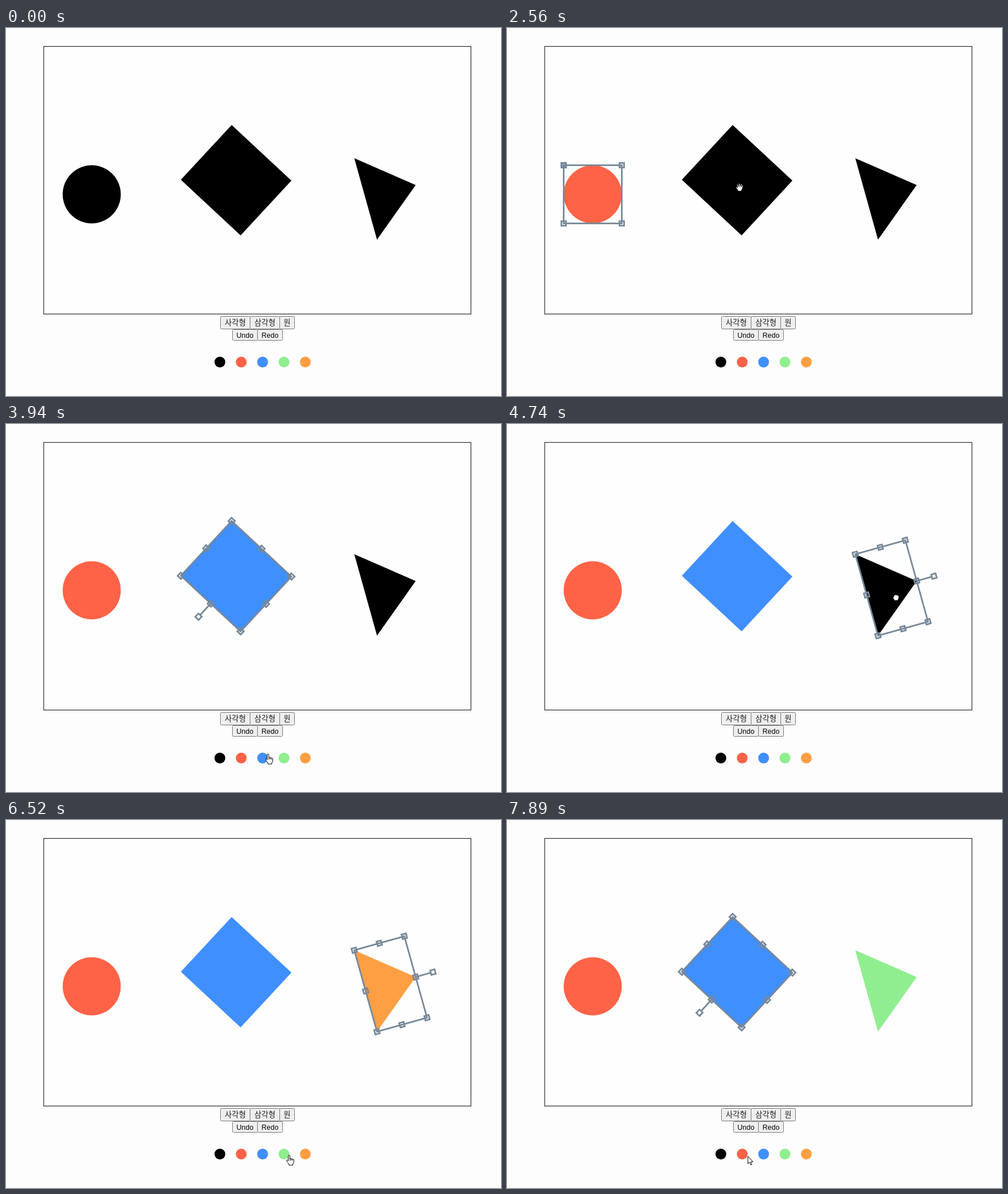
Animation, 869 px wide and 645 px high, one loop 7.99 s. Source, as an HTML page:

```html
<!DOCTYPE html>
<html lang="ko">
<head>
<meta charset="utf-8">
<title>Shape editor</title>
<style>
  html, body { margin: 0; width: 100%; height: 100%; overflow: hidden; background: #fdfdfd; }
  svg { display: block; }
  text { font: 12.5px "Liberation Sans", Arial, sans-serif; text-anchor: middle; }
  .ko { font: 300 13.4px "Noto Sans CJK KR", "Noto Sans CJK", sans-serif; fill: #222; }
  .button { fill: #efefef; stroke: #767676; }
  .frame { fill: none; stroke: #778899; stroke-width: 2.8; }
  .cursor { stroke: #000; stroke-width: 1; stroke-linejoin: round; fill: #fff; }
</style>
</head>
<body>
<svg id="stage" width="869" height="645" viewBox="0 0 869 645"></svg>
<script>
const LOOP = 7990, PRESS = 100, TICK = 98;
const COLORS = ['#000', '#ff6347', '#408fff', '#90ee90', '#ff9f43'];
const stage = document.getElementById('stage');

function add(parent, tag, attrs, text) {
  const el = document.createElementNS('http://www.w3.org/2000/svg', tag);
  for (const key in attrs) el.setAttribute(key, attrs[key]);
  if (text) el.textContent = text;
  parent.append(el);
  return el;
}

// Page furniture
add(stage, 'rect', { x: 66.2, y: 32.3, width: 750, height: 469, fill: '#fefefe', stroke: '#000' });

function buttonRow(x, y, h, labels, cls, width) {
  for (const label of labels) {
    const w = width(label);
    add(stage, 'rect', { x: x + .5, y: y + .5, width: w, height: h - 1, rx: 2, class: 'button' });
    add(stage, 'text', { x: x + (w + 1) / 2, y: y + h / 2 + 4.5, class: cls }, label);
    x += w;
  }
}
buttonRow(376, 505, 23, ['사각형', '삼각형', '원'], 'ko', s => 13 + 13 * s.length);
buttonRow(397, 528, 20, ['Undo', 'Redo'], '', () => 44);

const swatches = COLORS.map((fill, i) => {
  const x = 375.5 + 37.5 * i, y = 585.5;
  add(stage, 'circle', { cx: x, cy: y, r: 9.5, fill });
  return { x, y, fill };
});

// Outlines are in half widths and half heights; the knob is the side of the turning handle
const shapes = [
  { x: 150.5, y: 291.5, w: 102, h: 102, angle: 0 },
  { x: 404, y: 266.7, w: 143.2, h: 131, angle: 42.9, knob: [0, 1],
    outline: [[-1, -1], [1, -1], [1, 1], [-1, 1]] },
  { x: 675.3, y: 287.4, w: 91.2, h: 148.2, angle: -15.6, knob: [1, 0],
    outline: [[-1, -1], [1, 0], [-1, 1]] }
];

function place(s) {
  return add(stage, 'g', { transform: `translate(${s.x} ${s.y}) rotate(${s.angle})` });
}

function grip(parent, x, y, fill = 'none') {
  add(parent, 'rect', { x: x - 4, y: y - 4, width: 8, height: 8, style: `fill:${fill}` });
}

for (const s of shapes) {
  const points = s.outline && s.outline.map(([a, b]) => [a * s.w / 2, b * s.h / 2]).join(' ');
  s.body = points ? add(place(s), 'polygon', { points }) : add(place(s), 'circle', { r: s.w / 2 });
}

for (const s of shapes) {
  const g = s.frame = place(s), w = s.w / 2, h = s.h / 2;
  g.setAttribute('class', 'frame');
  add(g, 'rect', { x: -w, y: -h, width: s.w, height: s.h });
  for (const a of [-1, 0, 1]) for (const b of [-1, 0, 1]) {
    if (s.knob ? a || b : a && b) grip(g, a * w, b * h);
  }
  if (s.knob) {
    const [a, b] = s.knob, x = a * (w + 31.5), y = b * (h + 31.5);
    add(g, 'path', { d: `M${a * w} ${b * h}L${x} ${y}` });
    grip(g, x, y, '#fefefe');
  } else grip(g, -w, -h, '#77889999');
}

// Cursors, drawn around their hot spot
const cursorPaths = {
  arrow: 'M0 0V13L3 10.3L5 15L7 14.2L5 9.6H9Z',
  pointer: 'M-1.4 1.2Q0-.8 1.4 1.2V6.4Q3 5.6 3.8 6.9Q5.4 6.2 6.2 7.6Q8.4 7.3 8.4 9.4L8.2 13L6.6 16V18H-.2V16.2L-4.4 10.6Q-4.6 8.4-2.6 9L-1.4 10.4ZM1.4 6.4V10M3.8 7V10M6.2 7.6V10',
  open: 'M-3 7L-4 4L-6.5 1Q-7-.8-5-.6L-3.5 1L-5-4Q-4.8-6-3.2-5L-1.8-1L-2-5.8Q-.8-7.5 .2-5.8L.6-1.2L1.8-5.6Q3.2-6.8 3.8-5L3-.6L4.6-3.4Q6.2-4 6-2.2L4.8 2.4L3.4 5L3.2 7Z',
  grab: 'M-3 5.5L-3.4 3.6L-5.5 1Q-5.8-1-3.8-1L-4-3Q-3.2-5-1.8-4Q-.4-5.6 .8-4Q2.2-5 3-3.6Q5-3.6 5-1.6L4.6 2.4L3.2 4L3 5.5Z'
};
const cursor = add(stage, 'path', { class: 'cursor' });

// The mouse story: every move eases out along a bowed line, in ticks
const moves = [], clicks = [];
let last = null;
function show(t, x, y) {
  last = { x, y };
  moves.push({ t, at: () => ({ x, y }) });
}
function hide(t) {
  moves.push({ t, at: () => null });
}
function glide(t, end, x, y, bow = 0) {
  const from = last, dx = x - from.x, dy = y - from.y, len = Math.hypot(dx, dy);
  const steps = Math.round((end - t) / TICK);
  last = { x, y };
  moves.push({ t, at(now) {
    const u = Math.min(1, Math.floor((now - t) / (end - t) * steps) / steps);
    const p = 1 - (1 - u) ** 2, side = bow * 4 * p * (1 - p) / len;
    return { x: from.x + dx * p - dy * side, y: from.y + dy * p + dx * side };
  } });
}
function click(t) {
  clicks.push(t);
}

show(390, 460, 200);
glide(390, 790, 168.5, 317, -35);
click(1190);
glide(1190, 1290, 261, 406);
hide(1380);
show(1680, 441, 607);
glide(1680, 1970, 415, 587);
click(2170);
glide(2170, 2560, 408.5, 279);
click(2760);
glide(2760, 2860, 432, 410);
hide(2950);
show(3050, 476, 529);
glide(3050, 3540, 460, 578, 18);
click(3940);
glide(4040, 4540, 683, 304);
click(4740);
glide(4740, 5440, 524, 589.5, -90);
click(5930);
glide(6130, 6520, 497, 587);
click(6720);
glide(6810, 7210, 410, 285);
click(7310);
glide(7310, 7700, 420, 634);
glide(7700, 7890, 422.9, 589.5);

function cursorAt(t) {
  const move = moves.filter(m => m.t <= t).pop();
  return move ? move.at(t) : null;
}

function inside(s, { x, y }) {
  const r = s.angle * Math.PI / 180, dx = x - s.x, dy = y - s.y;
  const u = 2 * (dx * Math.cos(r) + dy * Math.sin(r)) / s.w;
  const v = 2 * (dy * Math.cos(r) - dx * Math.sin(r)) / s.h;
  if (!s.outline) return Math.hypot(u, v) <= 1;
  if (s.outline.length === 3) return u >= -1 && Math.abs(v) <= (1 - u) / 2;
  return Math.abs(u) <= 1 && Math.abs(v) <= 1;
}
const shapeAt = p => shapes.find(s => inside(s, p));
const swatchAt = p => swatches.find(c => Math.max(Math.abs(p.x - c.x), Math.abs(p.y - c.y)) < 9.7);

// Clicking a shape picks it; clicking a swatch paints the picked shape
function stateAt(t) {
  const fills = new Map();
  let picked = null;
  for (const time of clicks.filter(c => c <= t)) {
    const p = cursorAt(time), swatch = swatchAt(p);
    if (swatch) fills.set(picked, swatch.fill);
    else picked = shapeAt(p);
  }
  return { fills, picked };
}

function cursorKind(t, p) {
  if (swatchAt(p)) return 'pointer';
  if (!shapeAt(p)) return 'arrow';
  return clicks.some(c => t >= c && t < c + PRESS) ? 'grab' : 'open';
}

function draw(t) {
  const { fills, picked } = stateAt(t), p = cursorAt(t);
  for (const s of shapes) {
    s.body.setAttribute('fill', fills.get(s) || COLORS[0]);
    s.frame.style.display = s === picked ? '' : 'none';
  }
  cursor.style.display = p ? '' : 'none';
  if (!p) return;
  cursor.setAttribute('d', cursorPaths[cursorKind(t, p)]);
  cursor.setAttribute('transform', `translate(${p.x} ${p.y})`);
}

const start = performance.now();
function tick() {
  draw((performance.now() - start) % LOOP);
  requestAnimationFrame(tick);
}
tick();
</script>
</body>
</html>
```
